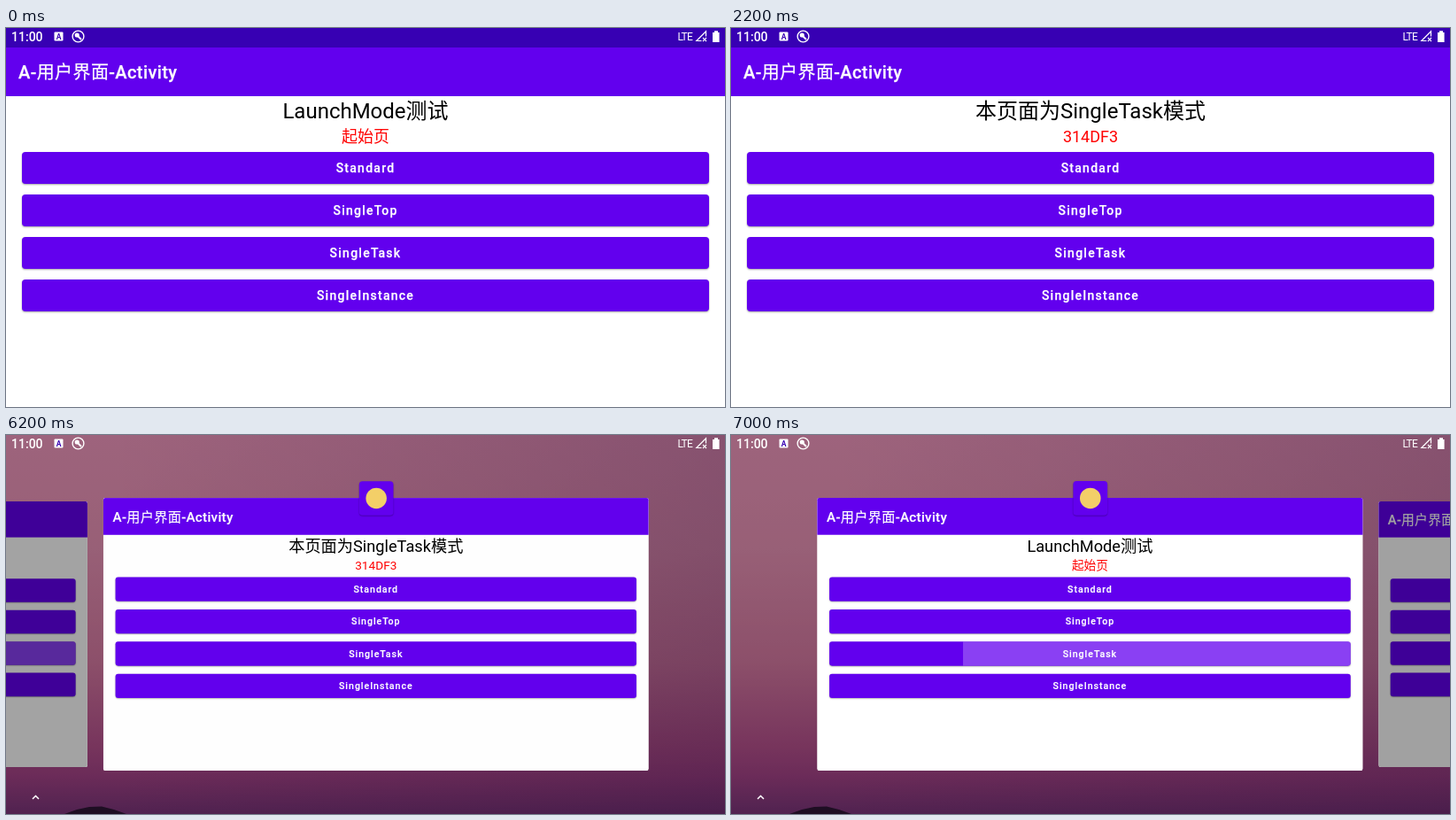
Recreate the animation shown at these times as an HTML page. Size 812x428 px, loop 8700 ms.

```html
<!DOCTYPE html>
<html lang="zh-CN">
<head>
<meta charset="utf-8">
<title>LaunchMode</title>
<style>
html, body { margin: 0; width: 100%; height: 100%; overflow: hidden; }
body { position: relative; font-family: Roboto, "Noto Sans CJK SC", "Noto Sans CJK", sans-serif; }
.wall, .scrim, .bar { position: absolute; left: 0; top: 0; width: 812px; height: 428px; }
.wall {
  background:
    linear-gradient(90deg, transparent 15%, rgba(70, 20, 90, .2)),
    linear-gradient(#f9a0c4, #f09aba 30%, #dd80a6 60%, #bb5590 82%, #a8468a 90%, #7c377c);
}
.scrim { background: #0a0008; }
.card { position: absolute; left: 0; top: 0; width: 812px; height: 428px; transform-origin: 0 0; }
.win { position: absolute; inset: 0; background: #fff; box-shadow: 0 0 0 2px #fff; }
.win > * { position: absolute; }
.status { left: -2px; right: -2px; top: -3px; height: 25px; background: #3700b3; }
.title {
  left: -2px; right: -2px; top: 22px; height: 55px; padding-left: 16px;
  background: #6200ee; color: #fff; font-weight: 500; font-size: 20px;
  line-height: 56px; letter-spacing: .4px; white-space: nowrap;
}
.title, .btn { -webkit-text-stroke: .25px #fff; }
.title span { font-weight: 400; }
.head, .sub { left: 0; width: 812px; text-align: center; white-space: nowrap; }
.head { top: 77px; font-size: 24px; line-height: 35px; color: #000; }
.sub { top: 110px; font-size: 18px; line-height: 26px; color: #f00; }
.btn {
  left: 18px; width: 776px; height: 36px; border-radius: 4px; overflow: hidden;
  background: #6200ee; color: #fff; text-align: center;
  font-weight: 500; font-size: 14px; line-height: 37px; letter-spacing: 1.25px;
}
.btn, .icon { box-shadow: 0 1px 2px rgba(0, 0, 0, .35); }
.btn b { position: relative; font-weight: inherit; }
.ripple { position: absolute; left: 199px; right: 0; top: 0; bottom: 0; background: #fff; }
.dim { inset: -3px; background: #000; }
.side { position: absolute; left: 814px; top: -3px; width: 48px; height: 433px; background: #000; }
.icon {
  position: absolute; left: 380.5px; top: -3.5px; width: 51px; height: 51px;
  border-radius: 5px; background: #6200ee;
}
.icon::after {
  content: ""; position: absolute; left: 10px; top: 10px; width: 31px; height: 31px;
  border-radius: 50%; background: #f3cf68;
}
</style>
</head>
<body>
<div class="wall">
  <svg width="812" height="428"><path d="M66 428L80 423L94 420L108 419.5L122 423L136 428Z" fill="#2b1733"/></svg>
</div>
<div class="scrim" id="scrim"></div>
<svg class="bar" id="chevron"><path d="M30 411l3.5-3.5l3.5 3.5" fill="none" stroke="#fff" stroke-width="1.5"/></svg>
<div class="card" id="home"></div>
<div class="card" id="task"></div>
<svg class="bar" fill="#fff">
  <text x="6" y="15" font-size="14" font-weight="500">11:00</text>
  <rect x="54.5" y="4.5" width="10" height="10" rx="1"/>
  <text x="59.5" y="12.6" font-size="8.5" font-weight="700" text-anchor="middle" fill="#3700b3">A</text>
  <circle cx="81.5" cy="9.5" r="6.4" fill="none" stroke="#fff" stroke-width="1.4"/>
  <circle cx="80.2" cy="8" r="2.6"/>
  <path d="M80.5 8.5l4.5 4.5" stroke="#fff" stroke-width="2"/>
  <text x="758.5" y="14" font-size="12" letter-spacing="-.8">LTE</text>
  <path d="M785.5 14.5H779.8L790.5 3.8V9.5" fill="none" stroke="#fff" stroke-width="1.2"/>
  <path d="M787 11l4 4m0-4l-4 4" stroke="#fff" stroke-width="1.1"/>
  <path d="M798 5h2V3.3h4V5h1.6V16H798Z"/>
</svg>
<script>
const LOOP = 8700, STEP = 100;
const MID_X = 406, MID_Y = 225, THUMB = 0.7586, PAGE = 626, SLIDE = 862;
const $ = id => document.getElementById(id);
const lerp = (a, b, p) => a + (b - a) * p;

// cubic-bezier(.4, 0, .2, 1) over a span of time
function ease(t, start, length) {
  const x = Math.min(1, Math.max(0, (t - start) / length));
  let lo = 0, hi = 1, u = x;
  for (let i = 0; i < 24; i++) {
    u = (lo + hi) / 2;
    const v = 1 - u;
    if (1.2 * u * v * v + 0.6 * u * u * v + u * u * u < x) lo = u; else hi = u;
  }
  return x === 0 || x === 1 ? x : u * u * (3 - 2 * u);
}

function build(id, head, sub) {
  const labels = ["Standard", "SingleTop", "SingleTask", "SingleInstance"];
  const buttons = labels.map((label, i) => {
    const ripple = id === "home" && i === 2 ? '<i class="ripple"></i>' : "";
    return `<div class="btn" style="top:${140 + 48 * i}px">${ripple}<b>${label}</b></div>`;
  }).join("");
  const el = $(id);
  el.innerHTML = `<div class="side"></div><div class="win"><div class="status"></div>
    <div class="title">A-<span>用户界面</span>-Activity</div>
    <div class="head">${head}</div><div class="sub">${sub}</div>${buttons}
    <div class="dim"></div></div><div class="icon"></div>`;
  const part = name => el.querySelector("." + name);
  return { el, win: part("win"), dim: part("dim"), icon: part("icon"), side: part("side"), ripple: part("ripple") };
}

const home = build("home", "LaunchMode测试", "起始页");
const task = build("task", "本页面为SingleTask模式", "314DF3");

function place(card, cx, scale) {
  const x = cx - MID_X * scale, y = MID_Y * (1 - scale);
  card.el.style.transform = `translate(${x}px,${y}px) scale(${scale})`;
}

function style(card, p, dim, icon, side) {
  card.win.style.clipPath = p > 0 ? `inset(${22 * p}px 0 0 0 round ${3 * p}px)` : "inset(-3px -2px -2px)";
  card.dim.style.opacity = dim;
  card.icon.style.opacity = icon;
  card.side.style.display = side ? "block" : "none";
}

function opening(t) {
  const slide = ease(t, 1332, 490);
  const moving = t >= 1400;
  place(home, MID_X - (moving ? SLIDE * slide : 0), moving ? lerp(1, 0.95, ease(t, 1332, 268)) : 1);
  place(task, MID_X + SLIDE * (moving ? 1 - slide : 1), lerp(0.95, 1, ease(t, 1620, 530)));
  style(home, 0, 0, 0, moving);
  style(task, 0, 0, 0, false);
  home.ripple.style.opacity = moving ? Math.min(0.25, 0.06 + (t - 1400) * 0.0004) : 0;
  $("scrim").style.opacity = 0;
  $("chevron").style.opacity = 0;
}

function overview(t) {
  const p = ease(t, 4656, 544), scroll = ease(t, 6132, 767);
  const icon = Math.min(1, Math.max(0, (t - 4900) / 300));
  [[home, scroll - 1], [task, scroll]].forEach(([card, at]) => {
    const far = Math.abs(at), size = lerp(1, THUMB, p);
    place(card, MID_X - 0.6 * p + at * PAGE * size / THUMB, size * (1 - 0.026 * far * p));
    style(card, p, 0.37 * Math.pow(far, 1.3) * p, icon, false);
  });
  home.ripple.style.opacity = 0.25;
  $("scrim").style.opacity = 0.38 * p;
  $("chevron").style.opacity = icon;
}

function draw(now) {
  const t = Math.floor((now + 4) / STEP) * STEP % LOOP;
  if (t < 4700) opening(t); else overview(t);
  requestAnimationFrame(draw);
}
draw(0);
</script>
</body>
</html>
```
